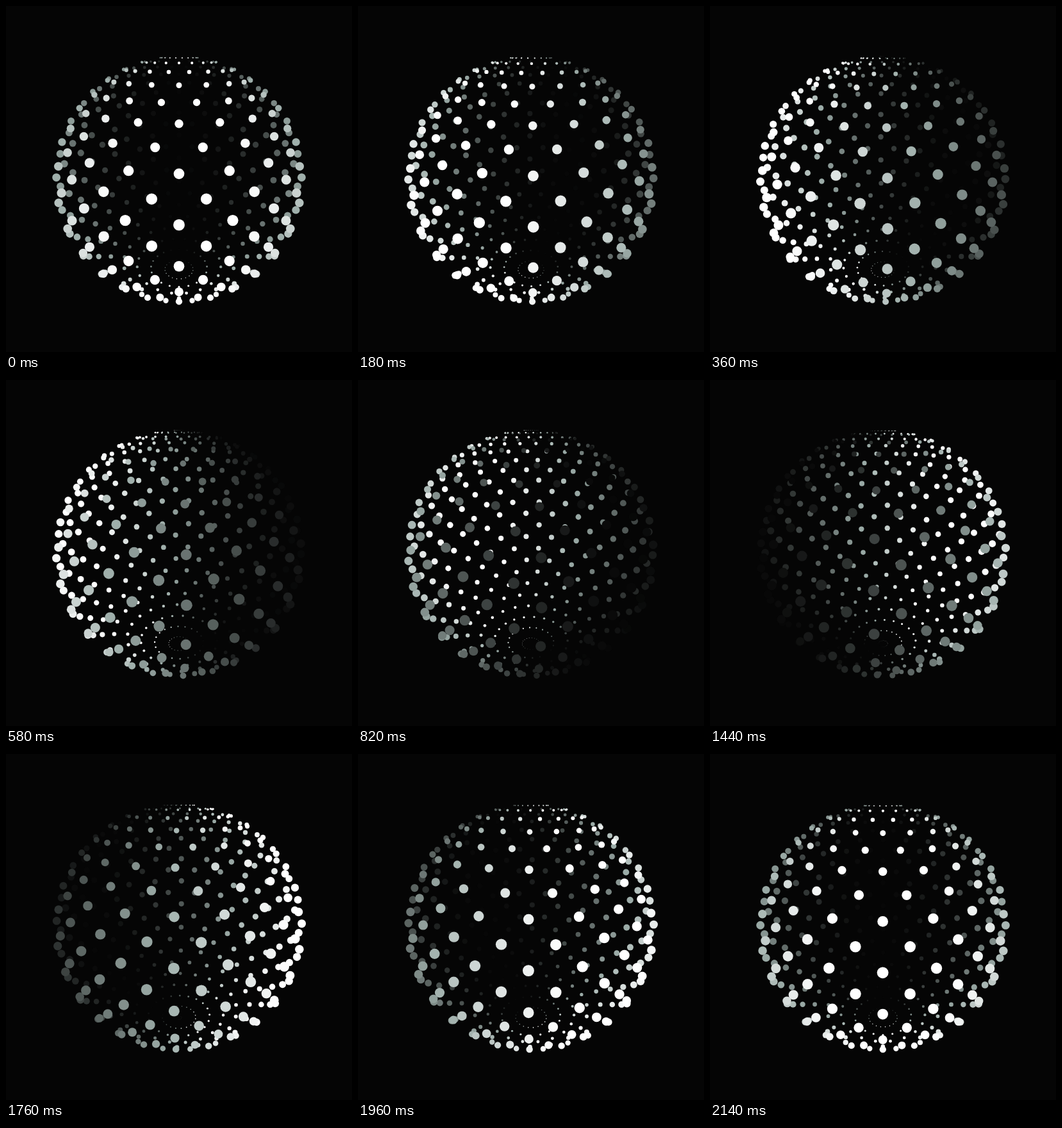
Recreate the animation shown at these times as an HTML page with a canvas. Size 540 px wide and 540 px high, loop 2160 ms.

```html
<!DOCTYPE html>
<html lang="en">
<head>
<meta charset="utf-8">
<title>Dotted sphere</title>
<style>
  html, body { margin: 0; width: 100%; height: 100%; overflow: hidden; background: #050505; }
  canvas { display: block; width: 540px; height: 540px; }
</style>
</head>
<body>
<canvas id="stage" width="540" height="540"></canvas>
<script>
const ctx = document.getElementById('stage').getContext('2d');
const LOOP = 2160, STEP = 20;
const CENTER = 270, FOCAL = 460, DISTANCE = 2.6, TILT = 0.4;
const DOT = 0.032;
const COLUMNS = 20, HALF_ROWS = 11;
const ROW_ANGLE = Math.PI / (2 * HALF_ROWS);
const COLUMN_ANGLE = 2 * Math.PI / COLUMNS;
const SIN = Math.sin(TILT), COS = Math.cos(TILT);

// Shade stops: unlit, halfway, fully lit
const DARK = [7, 7, 7], MID = [158, 174, 170], LIGHT = [255, 255, 255];
const MID_AT = 0.65, LIGHT_AT = 0.97;

function mix(a, b, t) {
  return `rgb(${a.map((v, i) => Math.round(v + (b[i] - v) * t)).join(',')})`;
}

function shade(u) {
  return u < MID_AT
    ? mix(DARK, MID, u / MID_AT)
    : mix(MID, LIGHT, Math.min(1, (u - MID_AT) / (LIGHT_AT - MID_AT)));
}

function project(lat, lon, lightLon) {
  const ring = Math.cos(lat);
  const up = Math.sin(lat);
  const front = ring * Math.cos(lon);
  const depth = up * SIN + front * COS;
  const scale = FOCAL / (DISTANCE - depth);
  return {
    depth,
    x: CENTER + scale * ring * Math.sin(lon),
    y: CENTER - scale * (up * COS - front * SIN),
    r: DOT * ring * scale,
    color: shade((1 + Math.cos(lon - lightLon)) / 2)
  };
}

function draw(p) {
  const dots = [];
  const lightLon = -2 * Math.PI * p;
  // Each loop carries every dot one row down and half a column sideways
  for (let row = 1 - HALF_ROWS; row <= HALF_ROWS; row++) {
    const lat = (row - p) * ROW_ANGLE;
    const shift = (row % 2 ? 0 : 0.5) + p / 2;
    for (let col = 0; col < COLUMNS; col++) {
      dots.push(project(lat, (col + shift) * COLUMN_ANGLE, lightLon));
    }
  }
  dots.sort((a, b) => a.depth - b.depth);

  ctx.fillStyle = '#050505';
  ctx.fillRect(0, 0, 540, 540);
  for (const d of dots) {
    ctx.fillStyle = d.color;
    ctx.beginPath();
    ctx.arc(d.x, d.y, Math.max(0, d.r), 0, 2 * Math.PI);
    ctx.fill();
  }
}

const start = performance.now();
function tick() {
  const time = Math.max(0, performance.now() - start) % LOOP;
  draw(Math.floor(time / STEP) * STEP / LOOP);
  requestAnimationFrame(tick);
}
tick();
</script>
</body>
</html>
```
